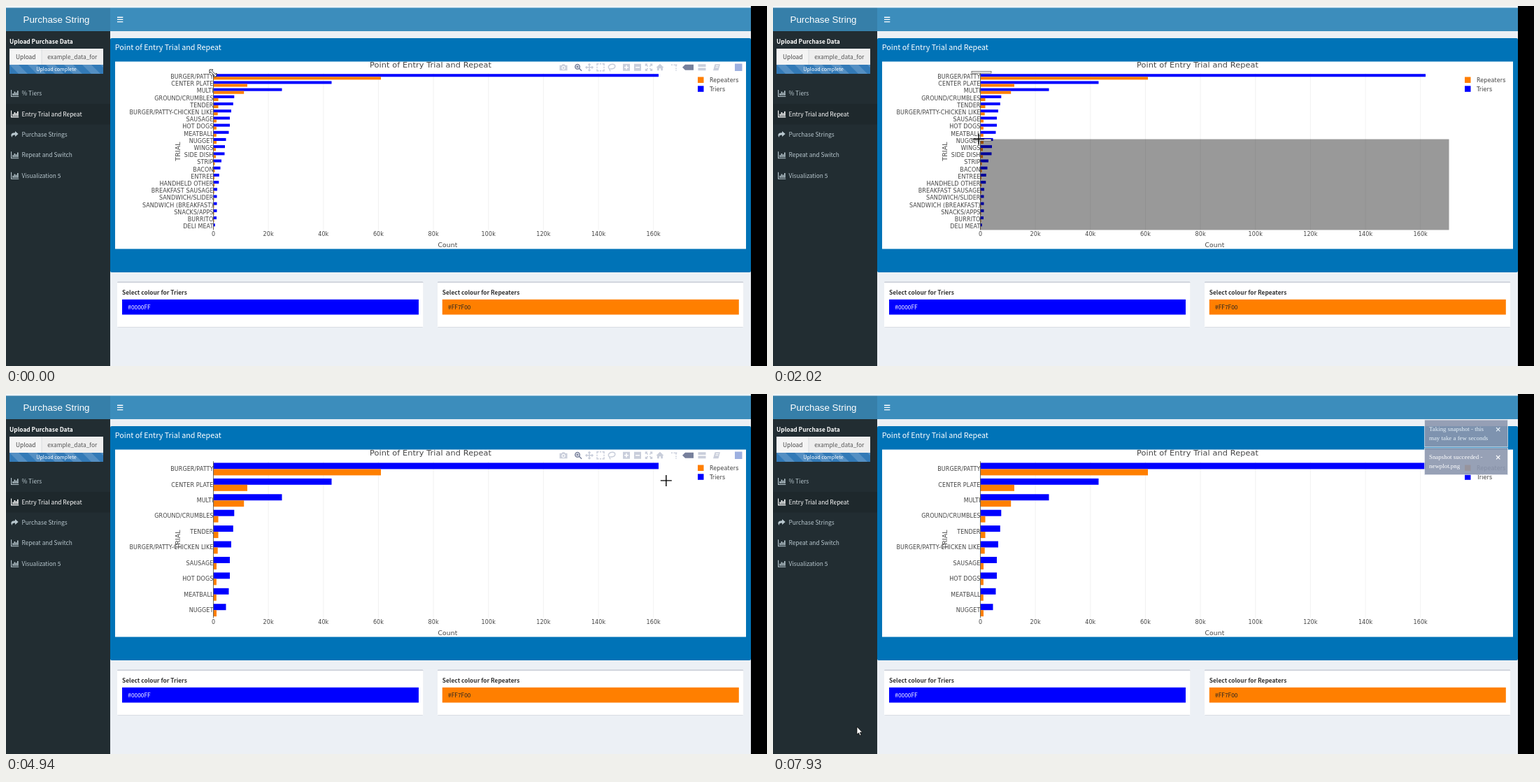
These frames come from a looping animation (1088 by 515 pixels, 8 s). An HTML page:

```html
<!DOCTYPE html>
<html lang="en">
<head>
<meta charset="utf-8">
<title>Point of Entry Trial and Repeat</title>
<style>
  html, body { margin: 0; width: 100%; height: 100%; overflow: hidden; background: #ecf0f5; }
  svg { display: block; width: 1088px; height: 515px; }
  text { white-space: pre; }
  .ui { font: 8.37px "Noto Sans CJK SC", "Noto Sans CJK JP", "Open Sans", sans-serif; }
  .plot { font: 8px "DejaVu Sans", sans-serif; letter-spacing: .1px; fill: #444; }
  .note { font: 8.9px "Liberation Serif", serif; fill: #fff; }
  .bold { font-weight: 700; }
  .mid { text-anchor: middle; }
  .end { text-anchor: end; }
  .line { fill: none; stroke-width: 1.5; }
</style>
</head>
<body>
<svg id="stage" viewBox="0 0 1088 515">
  <defs>
    <pattern id="stripes" x="5" y="84" width="26" height="26" patternUnits="userSpaceOnUse">
      <path d="M0 26V13L13 26ZM0 0H13L26 13V26Z" fill="#fff" fill-opacity=".16"/>
    </pattern>
    <path id="chartIcon" d="M0 0H1.1V8.9H11.2V10H0ZM2.4 5H4V8H2.4ZM4.6 2.6H6.2V8H4.6ZM6.8 3.8H8.4V8H6.8ZM9 1.2H10.6V8H9Z"/>
    <path id="shareIcon" d="M6 0L10.6 4L6 8V5.6C3 5.5 1.6 6.4 1.8 9C-.9 6 0 2.4 6 2.4Z"/>
  </defs>

  <!-- page frame -->
  <rect width="1088" height="515" fill="#ecf0f5"/>
  <rect width="1065" height="2.5" fill="#eef4f7"/>
  <rect x="149" y="2.5" width="916" height="33.5" fill="#3c8dbc"/>
  <rect y="2.5" width="149" height="33.5" fill="#367fa9"/>
  <rect y="36" width="149" height="479" fill="#222d32"/>
  <text x="72" y="24.4" class="mid" font-family="Liberation Sans, sans-serif" font-size="13.35" fill="#fff">Purchase String</text>
  <path d="M159 16.2H167.3M159 19.4H167.3M159 22.6H167.3" stroke="#fff" stroke-width="1.4"/>

  <!-- upload -->
  <g class="ui">
    <text x="5" y="54" class="bold" fill="#fff">Upload Purchase Data</text>
    <rect x="5" y="61" width="134" height="23" fill="#eee"/>
    <rect x="5" y="61" width="46" height="23" fill="#f4f4f4"/>
    <path d="M51 61V84" stroke="#d0d3d6" stroke-width=".7"/>
    <text x="28.3" y="75.6" class="mid" fill="#444">Upload</text>
    <text x="59.3" y="75.6" fill="#555">example_data_for</text>
    <rect x="5" y="84" width="134" height="13" fill="#337ab7"/>
    <rect x="5" y="84" width="134" height="13" fill="url(#stripes)"/>
    <text x="72" y="93.4" class="mid" font-size="7.2" font-weight="500" fill="#fff">Upload complete</text>
  </g>
  <rect y="140" width="149" height="29.5" fill="#1e282c"/>
  <g id="menu" class="ui"></g>

  <!-- chart panel -->
  <rect x="149" y="46" width="916" height="335" rx="2" fill="#0073b7"/>
  <text x="155.8" y="63" class="ui" style="font-size:10.75px" fill="#fff">Point of Entry Trial and Repeat</text>
  <rect x="156" y="79.5" width="902" height="268" fill="#fff"/>
  <g id="pickers" class="ui"></g>
  <rect x="1065" width="23" height="515" fill="#000"/>

  <g class="plot">
    <g id="grid"></g>
    <g id="full"></g>
    <g id="zoomed"></g>
    <text x="607" y="88.4" class="mid" style="font-size:11.3px">Point of Entry Trial and Repeat</text>
    <text x="631.5" y="345" class="mid" style="font-size:9.2px">Count</text>
    <text transform="translate(249 208) rotate(-90)" class="mid" style="font-size:9.5px">TRIAL</text>
    <rect x="989" y="101.5" width="8.5" height="8.5" fill="#ff7f00"/>
    <rect x="989" y="114.3" width="8.5" height="8.5" fill="#00f"/>
    <text x="1006" y="108.9">Repeaters</text>
    <text x="1006" y="121.8">Triers</text>
  </g>

  <g id="drag">
    <rect id="shade" x="296.5" width="670" fill="#000"/>
    <g fill="#fff" stroke="#444" stroke-width=".7">
      <rect x="284" y="93.6" width="28" height="2.4"/>
      <rect id="handle" x="284" width="28" height="2.4"/>
    </g>
  </g>

  <g id="modebar"></g>
  <g id="tip">
    <path d="M797 94L801 98.5H793Z" fill="#69738f"/>
    <rect x="700.5" y="98" width="108" height="18" rx="1.5" fill="#69738f"/>
    <text x="754.5" y="109.4" class="plot mid" style="fill:#fff;letter-spacing:0">Download plot as a png</text>
  </g>
  <g id="notes"></g>

  <g id="cursor">
    <g id="corner" stroke-linejoin="round">
      <path d="M-5 -5H0L-1.7 -3.3L3.3 1.7L5 0V5H0L1.7 3.3L-3.3 -1.7L-5 0Z" fill="#fff" stroke="#000" stroke-width=".8"/>
    </g>
    <path id="cross" d="M-8 0H8M0 -8V8" stroke="#000" stroke-width="1.4"/>
    <path id="arrow" d="M0 0V11L2.5 8.8L4.2 12.6L6 11.8L4.3 8.1H7.7Z" fill="#fff" stroke="#000" stroke-width=".7"/>
    <path id="hand" d="M-1.1 .8Q0 -.8 1.1 .8V5L2.6 5.1L3 5.6L4.5 5.6L5 6.2Q6.7 6 6.7 7.6V10.5L5.5 14H-.6L-3.6 9.4Q-3.8 7.6 -1.1 9Z" fill="#fff" stroke="#000" stroke-width=".9"/>
  </g>
</svg>
<script>
const $ = id => document.getElementById(id);

function add(parent, tag, attrs, text) {
  const node = document.createElementNS('http://www.w3.org/2000/svg', tag);
  for (const key in attrs) node.setAttribute(key, attrs[key]);
  if (text) node.textContent = text;
  parent.appendChild(node);
  return node;
}

// Sidebar menu
['% Tiers', 'Entry Trial and Repeat', 'Purchase Strings', 'Repeat and Switch', 'Visualization 5'].forEach((label, i) => {
  const y = 125 + i * 29.45, fill = i === 1 ? '#fff' : '#b8c7ce';
  add($('menu'), 'use', { href: i === 2 ? '#shareIcon' : '#chartIcon', x: 7, y: y - 5, fill });
  add($('menu'), 'text', { x: 22.5, y: y + 3.1, fill, 'font-weight': i === 1 ? 500 : 400 }, label);
});

// Colour pickers
[[159, 'Triers', '#0000FF', '#fff'], [616.8, 'Repeaters', '#FF7F00', '#222']].forEach(([x, name, colour, ink]) => {
  const g = $('pickers');
  add(g, 'rect', { x, y: 394, width: 437.5, height: 66, rx: 2, fill: '#d9dde3' });
  add(g, 'rect', { x, y: 394, width: 437.5, height: 4, rx: 2, fill: '#d2d6de' });
  add(g, 'rect', { x, y: 396, width: 437.5, height: 63, fill: '#fff' });
  add(g, 'text', { x: x + 7, y: 412.7, class: 'bold', fill: '#333' }, 'Select colour for ' + name);
  add(g, 'rect', { x: x + 7, y: 419.8, width: 424, height: 21.7, fill: colour });
  add(g, 'text', { x: x + 15.3, y: 434, fill: ink }, colour);
});

// Chart
const LEFT = 296.5, TOP = 96.2, BOTTOM = 320.4;
const names = ['BURGER/PATTY', 'CENTER PLATE', 'MULTI', 'GROUND/CRUMBLES', 'TENDER', 'BURGER/PATTY-CHICKEN LIKE',
  'SAUSAGE', 'HOT DOGS', 'MEATBALL', 'NUGGET', 'WINGS', 'SIDE DISH', 'STRIP', 'BACON', 'ENTREE', 'HANDHELD OTHER',
  'BREAKFAST SAUSAGE', 'SANDWICH/SLIDER', 'SANDWICH (BREAKFAST)', 'SNACKS/APPS', 'BURRITO', 'DELI MEAT'];
const triers = [636.5, 169, 98, 29.8, 28.3, 25.5, 23.5, 23.5, 22, 18, 16.5, 16, 11.5, 10, 8.3, 7.8, 5.5, 5, 5, 5, 4.5, 2.3];
const repeaters = [239.5, 48.5, 43.7, 7, 7, 6.2, 4.5, 4.4, 4.3, 4.5, 3.5, 3.6, 2, 2, 1.5, 1.6, 1.2, 1, 1, 1, 1, .6];

for (let k = 0; k <= 8; k++) {
  const x = LEFT + k * 78.65;
  if (k) add($('grid'), 'path', { d: `M${x} ${TOP}V${BOTTOM}`, stroke: '#eee', 'stroke-width': .8 });
  add($('grid'), 'text', { x, y: 329, class: 'mid' }, k ? k * 20 + 'k' : '0');
}

function drawBars(g, count) {
  const step = (BOTTOM - TOP) / count, height = step * .4;
  for (let i = 0; i < count; i++) {
    const y = TOP + step * (i + .5);
    add(g, 'rect', { x: LEFT, y: y - height, width: triers[i], height, fill: '#00f' });
    add(g, 'rect', { x: LEFT, y, width: repeaters[i], height, fill: '#ff7f00' });
    add(g, 'text', { x: LEFT, y: y + 2.8, class: 'end' }, names[i]);
  }
  add(g, 'path', { d: `M${LEFT} ${TOP}V${BOTTOM}`, stroke: '#444', 'stroke-width': .8 });
}
drawBars($('full'), 22);
drawBars($('zoomed'), 10);

// Modebar: x, path, outlined, dark
const LIGHT = '#c9cedb', DARK = '#77809c';
const icons = [
  [797, 'M-5.5 -3H-2.5L-1.5 -4.5H1.5L2.5 -3H5.5V4.5H-5.5ZM0 -2A2.7 2.7 0 1 0 .01 -2ZM0 -.7A1.4 1.4 0 1 1 -.01 -.7Z'],
  [818, 'M-1 -4.2A3.3 3.3 0 1 0 -.99 -4.2M1.5 1.5L5 5M-2.6 -.9H.6M-1 -2.5V.7', 1, 1],
  [834, 'M-5 0H5M0 -5V5M-3.4 -1.6L-5 0L-3.4 1.6M3.4 -1.6L5 0L3.4 1.6M-1.6 -3.4L0 -5L1.6 -3.4M-1.6 3.4L0 5L1.6 3.4', 1],
  [850, 'M-5 -2.5V-5H-2.5M-1 -5H1M2.5 -5H5V-2.5M5 -1V1M5 2.5V5H2.5M1 5H-1M-2.5 5H-5V2.5M-5 1V-1', 1],
  [866, 'M-3 2.5C-7 -1 -3 -4.5 1 -4.5C6 -4.5 6 1 1 2C-1 2.4 -3 1.5 -3.3 2.8C-3.4 4 -1.5 3.5 -2.5 5.5', 1],
  [887, 'M-5 -5H5V5H-5ZM-3 -.8V.8H-.8V3H.8V.8H3V-.8H.8V-3H-.8V-.8Z'],
  [903, 'M-5 -5H5V5H-5ZM-3 -.8V.8H3V-.8Z'],
  [919, 'M-4.5 -2V-4.5H-2M2 -4.5H4.5V-2M4.5 2V4.5H2M-2 4.5H-4.5V2M-4 -4L-1.3 -1.3M4 -4L1.3 -1.3M4 4L1.3 1.3M-4 4L-1.3 1.3', 1],
  [935, 'M0 -5L5.5 .3H4V4.5H1.2V1.4H-1.2V4.5H-4V.3H-5.5Z'],
  [956, 'M-5 -3.5H-3M-1.5 -3.5H.5M2 -3.5V-1M2 .8V2.5M2 3.8V5M.8 -3.5H3.4', 1],
  [975, 'M-8 0L-4 -4H8V4H-4Z', 0, 1],
  [995, 'M-5.5 -4.5H5.5V-.8H-5.5ZM-5.5 .8H5.5V4.5H-5.5Z'],
  [1016, 'M-2.5 -4.5H5L2.5 4.5H-5ZM-1 -2.7L-1.3 -1.7H2.7L3 -2.7ZM-1.6 -.6L-1.9 .4H2.1L2.4 -.6Z']
];
const drawn = icons.map(([x, d, outlined, dark]) => {
  const paint = outlined ? 'stroke' : 'fill', colour = dark ? DARK : LIGHT;
  return add($('modebar'), 'path', { d, transform: `translate(${x} 87.8)`, class: outlined ? 'line' : '', [paint]: colour, 'fill-rule': 'evenodd' });
});
add($('modebar'), 'rect', { x: 1042, y: 82.5, width: 10.5, height: 10.5, fill: '#9db0e0' });

// Notifications
const notes = [
  [37, 'Taking snapshot - this', 'may take a few seconds'],
  [77, 'Snapshot succeeded -', 'newplot.png']
].map(([y, first, second]) => {
  const g = add($('notes'), 'g', { class: 'note' });
  add(g, 'rect', { x: 931.5, y, width: 119, height: 38.6, fill: '#8c97af', stroke: '#e6eaf1', 'stroke-width': .8 });
  add(g, 'text', { x: 938, y: y + 16 }, first);
  add(g, 'text', { x: 938, y: y + 29 }, second);
  add(g, 'path', { d: `M1034 ${y + 11}l5.4 5.4m0 -5.4l-5.4 5.4`, stroke: '#fff', 'stroke-width': 1.1 });
  return g;
});

// Motion
const ramp = (t, from, to) => Math.min(1, Math.max(0, (t - from) / (to - from)));

// Piecewise-linear value of column `col` in a list of [time, ...values]
function track(points, t, col = 1) {
  const i = points.findIndex(p => p[0] > t);
  if (i === 0) return points[0][col];
  if (i < 0) return points[points.length - 1][col];
  const a = points[i - 1], b = points[i];
  return a[col] + (b[col] - a[col]) * ramp(t, a[0], b[0]);
}

const RELEASE = 4040;
const edgePath = [[470, 96], [620, 99], [780, 114.5], [1000, 150], [1240, 185], [1400, 190.5], [2020, 190.5],
  [2250, 196.3], [2570, 196.3], [2720, 197.2], [3500, 197.2], [3650, 198]];
const pointerPath = [[RELEASE, 294, 198], [4200, 330, 192], [4450, 600, 160], [4700, 880, 130], [4870, 942, 124],
  [4940, 944, 124], [5050, 925, 112], [5200, 865, 93], [5350, 815, 89], [5500, 804, 89], [5660, 804, 89],
  [5900, 800, 88], [5990, 800, 88], [6130, 797, 87], [6600, 797, 87], [6750, 650, 190], [6900, 330, 350],
  [7050, 90, 470], [7150, 12, 502], [7310, 70, 472], [7500, 105, 474], [7900, 120, 476]];

const show = (id, on) => $(id).setAttribute('display', on ? 'inline' : 'none');
const fade = (node, value) => node.setAttribute('opacity', value);

function render(t) {
  const edge = track(edgePath, t), zoomed = t >= RELEASE;
  show('full', !zoomed);
  show('zoomed', zoomed);

  show('drag', t >= 580 && !zoomed);
  $('shade').setAttribute('y', edge);
  $('shade').setAttribute('height', BOTTOM - edge);
  fade($('shade'), .4 * ramp(t, 580, 820));
  $('handle').setAttribute('y', edge);

  fade($('modebar'), t < RELEASE ? 1 - ramp(t, 40, 280) : ramp(t, 4250, 4550) - ramp(t, 6800, 7100));
  drawn[0].setAttribute('fill', t > 5380 && t < 6700 ? DARK : LIGHT);
  fade($('tip'), ramp(t, 5350, 5480) - ramp(t, 6620, 6750));
  fade(notes[0], .9 * ramp(t, 6450, 7150));
  fade(notes[1], .9 * ramp(t, 7220, 7920));

  let kind = 'arrow', x = track(pointerPath, t, 1), y = track(pointerPath, t, 2);
  if (t < 470) { kind = 'corner'; x = 296; y = 96; }
  else if (!zoomed) { kind = 'cross'; x = 294; y = edge; }
  else if (t < 5180) kind = 'cross';
  else if (t < 6640) kind = 'hand';
  for (const id of ['corner', 'cross', 'arrow', 'hand']) show(id, id === kind);
  $('cursor').setAttribute('transform', `translate(${x} ${y})`);
}

const start = performance.now();
function frame() {
  render((performance.now() - start) % 8000);
  requestAnimationFrame(frame);
}
frame();
</script>
</body>
</html>
```
